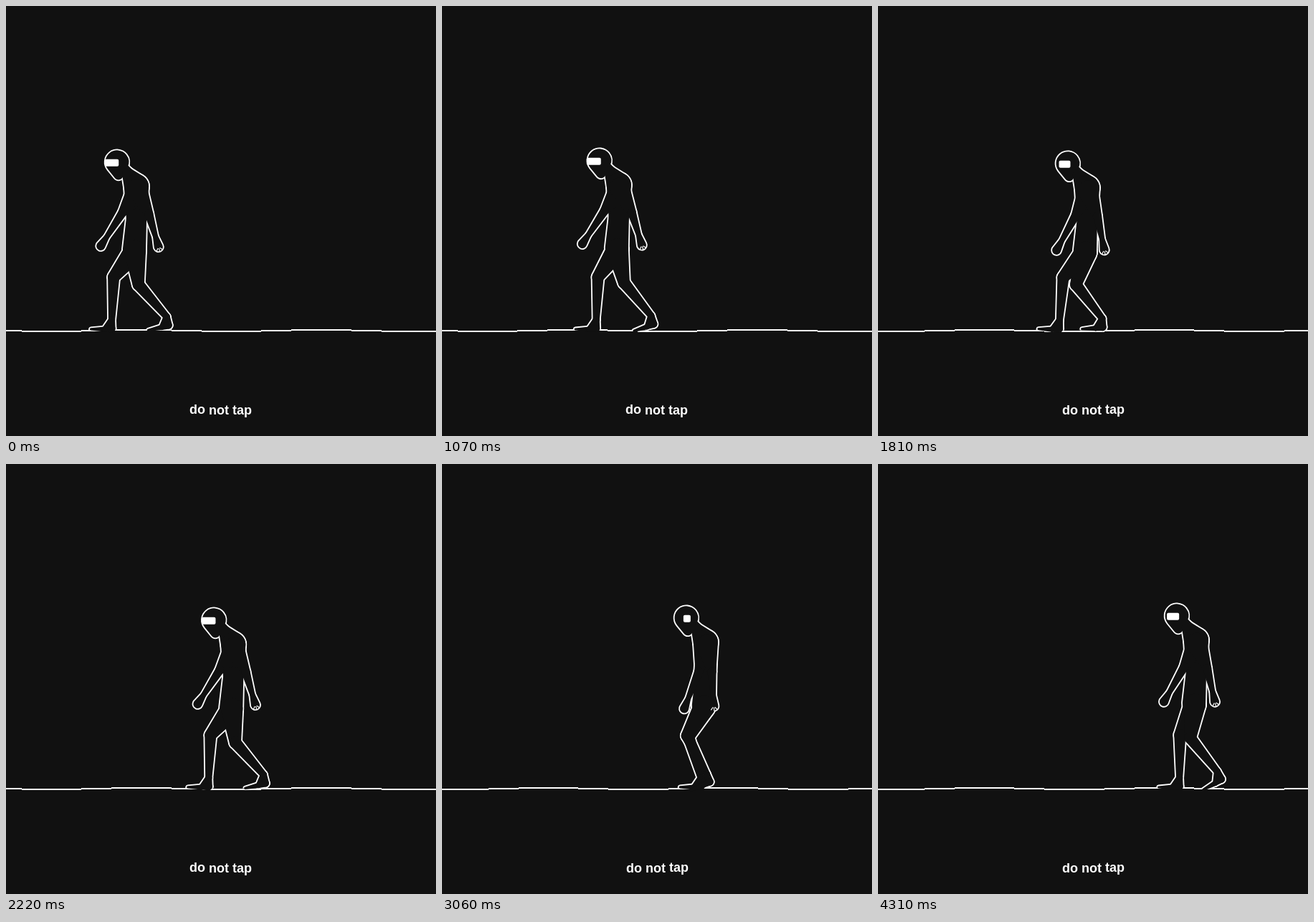
Animation of 600x600 px, one loop 4.36 s. Source, as an HTML page with a canvas:

```html
<!DOCTYPE html>
<html lang="en">
<head>
<meta charset="utf-8">
<title>Walker</title>
<style>
  html, body { margin: 0; width: 100%; height: 100%; overflow: hidden; background: #111; }
  canvas { display: block; width: 100vw; height: 100vh; }
</style>
</head>
<body>
<canvas id="stage" width="600" height="600"></canvas>
<script>
const ctx = document.getElementById('stage').getContext('2d');
const BG = '#111', INK = '#fff', TAU = Math.PI * 2;
const LOOP = 4360, STEPS = 94, STRIDE = 24; // stride length in steps
const SPEED = 2.817; // drift in px per step
const GROUND = 453, HALF_LINE = 0.9;
const { sin, cos, hypot, sqrt } = Math;

// One leg over a stride, at even eighths.
const ANKLE_X = [149, 146, 186, 209, 227, 193, 174, 160];
const ANKLE_Y = [438, 438, 432, 429, 433, 437, 438, 438];
const HEEL_LIFT = [0, 0, 0.4, 0.5, 0.25, 0, 0, 0];

// Smooth closed curve through evenly spaced keys.
function cycle(keys, phase) {
  const n = keys.length, pos = (phase % 1 + 1) % 1 * n;
  const i = Math.floor(pos), k = pos - i;
  const [a, b, c, d] = [-1, 0, 1, 2].map(o => keys[(i + o + n) % n]);
  return b + k * (c - a + k * (2 * a - 5 * b + 4 * c - d + k * (3 * (b - c) + d - a))) / 2;
}

// The first half of the stride runs a little slower than the second.
function gaitPhase(step) {
  const u = (step % STRIDE + 0.5) / STRIDE;
  return u - 0.035 * (1 - cos(TAU * u));
}

// Joints are [x, y, radius]; a chain joins neighbours with tapered limbs.
const chain = (...joints) => joints.slice(1).map((j, i) => [joints[i], j]);

function leg(phase, hip) {
  const THIGH = 47, SHIN = 60;
  const ax = cycle(ANKLE_X, phase), ay = cycle(ANKLE_Y, phase);
  const lift = cycle(HEEL_LIFT, phase);

  // Knee by two-bone reach, bending toward the face.
  const dx = ax - hip[0], dy = ay - hip[1], d = hypot(dx, dy);
  const along = (THIGH ** 2 - SHIN ** 2 + d * d) / (2 * d);
  const bend = sqrt(Math.max(0, THIGH ** 2 - along ** 2));
  const knee = [hip[0] + (dx * along - dy * bend) / d, hip[1] + (dy * along + dx * bend) / d, 9];

  const foot = (x, y, r) => [
    ax + x * cos(lift) + y * sin(lift),
    ay - x * sin(lift) + y * cos(lift), r];
  const ankle = [ax, ay, 5.5], heel = foot(0, 12, 6);
  const ball = foot(-10, 13, 4.5), toe = foot(-29, 13, 2.5);
  return [...chain(hip, knee, ankle, ball, toe), ...chain(ankle, heel, ball)];
}

// Angles are measured from straight down, positive toward the face.
function arm(shoulder, upper, lower, reach) {
  const from = ([x, y], angle, len, r) => [x - sin(angle) * len, y + cos(angle) * len, r];
  const elbow = from(shoulder, upper, 38, 7);
  return chain(shoulder, elbow, from(elbow, lower, reach - 15, 4.5), from(elbow, lower, reach, 7));
}

function limbPath([a, b], grow) {
  const [x1, y1, r1] = a, [x2, y2, r2] = b;
  const turn = Math.atan2(y2 - y1, x2 - x1);
  const lean = Math.max(-1, Math.min(1, (r1 - r2) / hypot(x2 - x1, y2 - y1)));
  const side = Math.acos(lean);
  ctx.beginPath();
  ctx.arc(x1, y1, r1 + grow, turn + side, turn - side + TAU);
  ctx.arc(x2, y2, r2 + grow, turn - side, turn + side);
  ctx.fill();
}

// Grown in ink, then shrunk in background: only the joint outline stays.
function drawOutline(limbs) {
  ctx.save();
  ctx.beginPath();
  ctx.rect(-600, 0, 1800, GROUND - 0.5);
  ctx.clip();
  ctx.fillStyle = INK;
  limbs.forEach(l => limbPath(l, HALF_LINE));
  ctx.restore();
  ctx.fillStyle = BG;
  limbs.forEach(l => limbPath(l, -HALF_LINE));
}

function drawFingers([wrist, palm]) {
  const angle = Math.atan2(palm[1] - wrist[1], palm[0] - wrist[0]);
  ctx.strokeStyle = INK;
  ctx.lineWidth = 1.2;
  ctx.beginPath();
  for (const spread of [-0.7, 0, 0.7]) {
    const c = cos(angle + spread), s = sin(angle + spread);
    ctx.moveTo(palm[0] + c * 2, palm[1] + s * 2);
    ctx.lineTo(palm[0] + c * 7, palm[1] + s * 7);
  }
  ctx.stroke();
}

function drawWalker(step) {
  const phase = gaitPhase(step);
  const open = cos(2 * TAU * (phase + 0.02)); // 1 with limbs spread, -1 with limbs together
  const bob = 4.2 * cos(2 * TAU * (phase - 0.1)) - 0.5;
  const joint = (x, y, r) => [x, y + bob, r];

  const skull = joint(155, 216, 17.3), chest = joint(182, 250, 18);
  const hip = joint(180, 340, 16), shoulder = joint(183, 254, 15);
  const rearArm = arm(shoulder, -0.33 - 0.13 * open, -0.18 - 0.12 * open, 48);

  ctx.save();
  ctx.translate(step * SPEED, 0);
  drawOutline([
    ...chain(skull, joint(157, 234, 7.5)),
    ...chain(joint(158, 220, 9), joint(170, 232, 9), chest),
    ...chain(chest, joint(182, 295, 15), joint(179, 338, 17)),
    ...arm(shoulder, 0.43 + 0.15 * open, 0.48 + 0.11 * open, 56),
    ...rearArm,
    ...leg(phase, hip),
    ...leg(phase + 0.5, hip)
  ]);
  drawFingers(rearArm.at(-1));

  ctx.fillStyle = INK;
  ctx.beginPath();
  ctx.roundRect(144 - 7 * open, 212 + bob, 15 + 5 * open, 10, 2);
  ctx.fill();
  ctx.restore();
}

const ripple = (x, crest) => Math.round(-cos((x - crest) * TAU / 251));

function drawGround(crest) {
  ctx.fillStyle = INK;
  for (let x = 0; x < 600; x++) ctx.fillRect(x, GROUND - 1 + ripple(x, crest), 1, 2);
}

function drawCaption(crest, left) {
  ctx.fillStyle = INK;
  ctx.font = 'bold 18px "Liberation Sans", Arial, sans-serif';
  let x = left;
  for (const word of ['do ', 'not ', 'tap ']) {
    const width = ctx.measureText(word).width;
    ctx.fillText(word, Math.round(x), 569 + ripple(x + width / 2, crest));
    x += width;
  }
}

function draw(now) {
  const step = Math.min(STEPS - 1, Math.floor((now % LOOP + 7.5) * STEPS / LOOP));
  const beat = step % (STRIDE / 2);
  const shifted = beat < 2 || beat > 9;
  const crest = shifted ? 188.5 : 148;
  ctx.fillStyle = BG;
  ctx.fillRect(0, 0, 600, 600);
  drawGround(crest);
  drawWalker(step);
  drawCaption(crest, shifted ? 256 : 257);
}

const start = performance.now();
function tick() {
  draw(performance.now() - start);
  requestAnimationFrame(tick);
}
tick();
</script>
</body>
</html>
```
